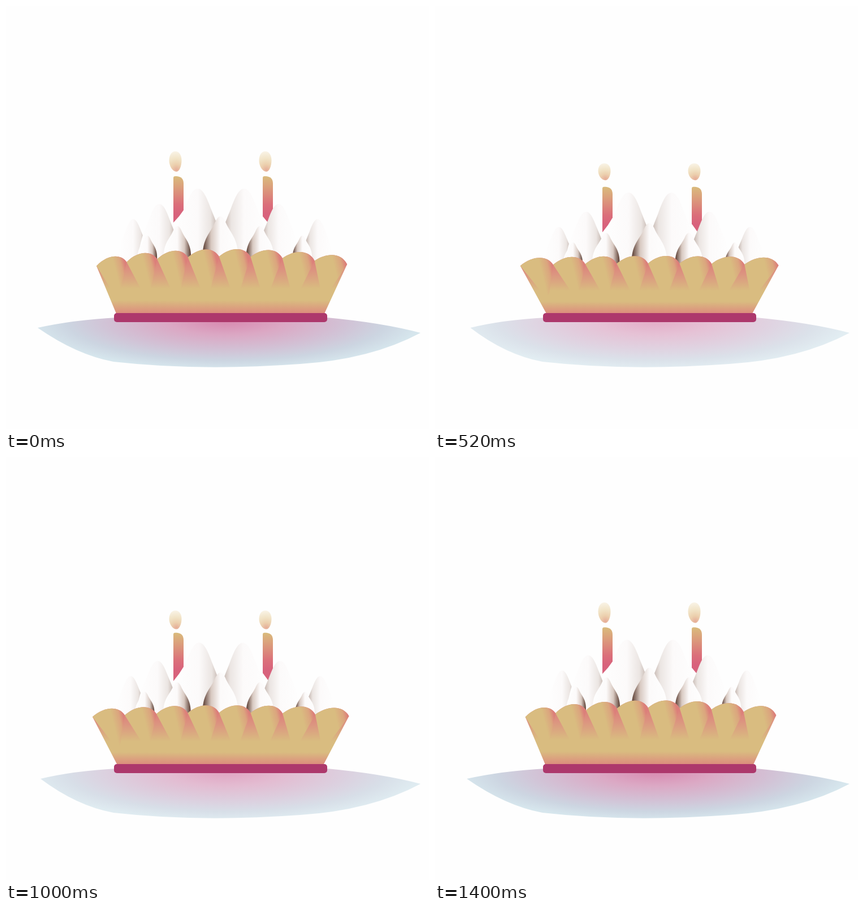
An HTML page with a canvas for the animation above (1.44 s loop, 748 by 748 pixels).

```html
<!DOCTYPE html>
<html lang="en">
<head>
<meta charset="utf-8">
<title>Birthday pie</title>
<style>
  html, body { margin: 0; width: 100%; height: 100%; overflow: hidden; background: #fefefe; }
  canvas { display: block; }
</style>
</head>
<body>
<canvas id="stage" width="748" height="748"></canvas>
<script>
const ctx = document.getElementById('stage').getContext('2d');
const LOOP = 1440, STEP = 40, SCALLOPS = 8, CENTER = 379;
const TAN = '#d9bc80', PINK = '#dc7f7a';

const OUTER = {
  xs: [225, 271, 339, 421, 482, 551], top: 323, drop: 27, base: 455, slim: .33,
  shape: 'M-1.1 0 C-1 -.4 -.75 -.55 -.55 -.72 C-.35 -.9 -.2 -1 0 -1 S.35 -.9 .55 -.72 C.75 -.55 1 -.4 1.1 0Z',
  shade: ['#fefefe', '#fcfafa', '#ebe5e2', '#ab978d'],
  sink: x => Math.min(13.5, Math.abs(x - CENTER) / 6)
};
const INNER = {
  xs: [250, 303, 379, 449, 524], top: 372, drop: 17, base: 448, slim: .41,
  shape: 'M-1 0 C-1.05 -.5 -.55 -.6 -.28 -.88 Q-.14 -1 0 -1 T.28 -.88 C.55 -.6 1.05 -.5 1 0Z',
  shade: ['#fefefe', '#fcfafa', '#d8c9c1', '#593b30'],
  sink: () => 12
};

// Rises from 0 to 1 at the peak time and falls back by the end of the loop.
function swell(t, peak, power) {
  const u = t < peak ? t / peak : (LOOP - t) / (LOOP - peak);
  return Math.sin(u * Math.PI / 2) ** power;
}

function withStops(gradient, stops) {
  for (const [at, color] of stops) gradient.addColorStop(at, color);
  return gradient;
}
const linear = (x0, y0, x1, y1, stops) => withStops(ctx.createLinearGradient(x0, y0, x1, y1), stops);
const radial = (x, y, r, stops) => withStops(ctx.createRadialGradient(x, y, 0, x, y, r), stops);

function fill(path, style) {
  ctx.fillStyle = style;
  ctx.fill(new Path2D(path));
}

function placed(x, y, sx, sy, paint) {
  ctx.save();
  ctx.translate(x, y);
  ctx.scale(sx, sy);
  paint();
  ctx.restore();
}

function plate(p) {
  const left = 56 + 6.5 * p;
  ctx.save();
  ctx.globalAlpha = 1 - .3 * p;
  ctx.clip(new Path2D(`M${left} 569 Q120 555 195 551 H568 Q665 560 733 578
    Q645 625 520 633 Q340 646 190 629 Q125 617 ${left} 569Z`));
  placed(390, 556, 1, .25, () => {
    ctx.fillStyle = radial(0, 0, 345, [
      [0, '#d888af'], [.3, '#dba8c4'], [.6, '#d2c1d5'], [.82, '#ccd5e1'], [1, '#d6e6ed']
    ]);
    ctx.fillRect(-350, -350, 700, 700);
  });
  ctx.restore();
}

function candle(x, top, leftEnd, midEnd, rightEnd) {
  fill(`M${x} ${top + 3} q0 -3 3 -3 h3 q12 1 12 13 V${rightEnd} L${x + 10} ${midEnd} L${x} ${leftEnd}Z`,
    linear(0, top, 0, top + 66, [[0, '#d9bb7c'], [.25, '#dba37c'], [.75, '#db6f7a'], [1, '#d8627c']]));
}

function flame(x, top, bottom) {
  placed(x, bottom, 1, (bottom - top) / 36, () =>
    fill('M0 -36 C7 -36 11 -29 11 -20 C11 -10 7 0 2 0 C-5 0 -11 -10 -11 -20 C-11 -29 -7 -36 0 -36Z',
      radial(2, -3, 33, [[0, '#e6ad98'], [.3, '#ecd0ae'], [.6, '#f1e3c6'], [1, '#f9f3e6']])));
}

function meringues({ xs, top, drop, base, slim, shape, shade, sink }, p) {
  const mid = (xs.length - 1) / 2;
  const stops = shade.map((color, i) => [[0, .5, .76, 1][i], color]);
  xs.forEach((x, i) => {
    const rank = Math.floor(Math.abs(i - mid));
    const away = x - CENTER, spread = Math.sign(away) * Math.min(6, (Math.abs(away) - 70) / 10);
    const y = top + drop * rank, width = slim * (base - y);
    const foot = base + 10 * p, height = foot - y - sink(x) * p;
    const side = i < Math.floor(xs.length / 2) ? 1 : -1;
    placed(x + spread * p, foot, width * side, height, () => fill(shape, linear(-1, 0, 1, 0, stops)));
  });
}

// Scalloped rim: notches lie on a shallow arch that flattens and fans out.
const notchX = (i, p) => 160 + 53 * i + .3 * i * i + .1 * p * (i - 4.5) ** 3;
const notchY = (i, p) => {
  const k = (i - 4.2) ** 2;
  return 443 + .95 * k + p * (12 - .7 * k);
};

function crust(p) {
  const petals = Array.from({ length: SCALLOPS }, (_, i) => {
    const x0 = notchX(i, p), x1 = notchX(i + 1, p), w = x1 - x0, y0 = notchY(i, p);
    const crest = notchY(i + .5, p) - 17.5;
    const curve = `C${x0 + .38 * w} ${crest} ${x0 + .82 * w} ${crest} ${x1} ${notchY(i + 1, p)}`;
    return { x0, x1, y0, curve };
  });
  const rim = petals.map(petal => petal.curve).join(' ');
  fill(`M${petals[0].x0} ${petals[0].y0} ${rim} L${563 - 2 * p} 544 H${195 + 2 * p}Z`,
    linear(0, 446 + 8 * p, 0, 544, [[0, PINK], [.22, '#dc9480'], [.55, TAN], [.76, TAN], [1, '#dc8b7d']]));

  petals.forEach(({ x0, x1, y0, curve }, i) => {
    // Petals lean outwards, so each tip sits nearer the middle of the base.
    const tip = 195 + 52.5 * i;
    fill(`M${x0} ${y0} ${curve} L${tip + 7} 508 Q${tip} 520 ${tip - 5} 508Z`,
      linear(x0, 480, x1, 466, [[0, TAN], [.65, TAN], [.87, '#dba57e'], [1, PINK]]));
  });
}

function draw(t) {
  const p = 1.09 * swell(t, 660, 1.35), q = 1.04 * swell(t, 540, 1.8);
  ctx.fillStyle = '#fefefe';
  ctx.fillRect(0, 0, 748, 748);

  plate(p);
  const top = 301 + 18 * q;
  candle(296, top, 383 + 17 * p, 372 + 15 * p, 361 + 13 * p);
  candle(454, top, 372 + 13 * p, 384 + 15 * p, 370 + 18 * p);
  for (const x of [299.5, 458.5]) flame(x, 257 + 21 * p ** 1.4, 293 + 15 * p);

  meringues(OUTER, p);
  meringues(INNER, p);
  crust(p);

  ctx.fillStyle = '#ad386c';
  ctx.beginPath();
  ctx.roundRect(191, 543, 377, 16, 5);
  ctx.fill();
}

const start = performance.now();
function tick() {
  const t = (performance.now() - start) % LOOP;
  draw(Math.floor(t / STEP) * STEP);
  requestAnimationFrame(tick);
}
tick();
</script>
</body>
</html>
```
